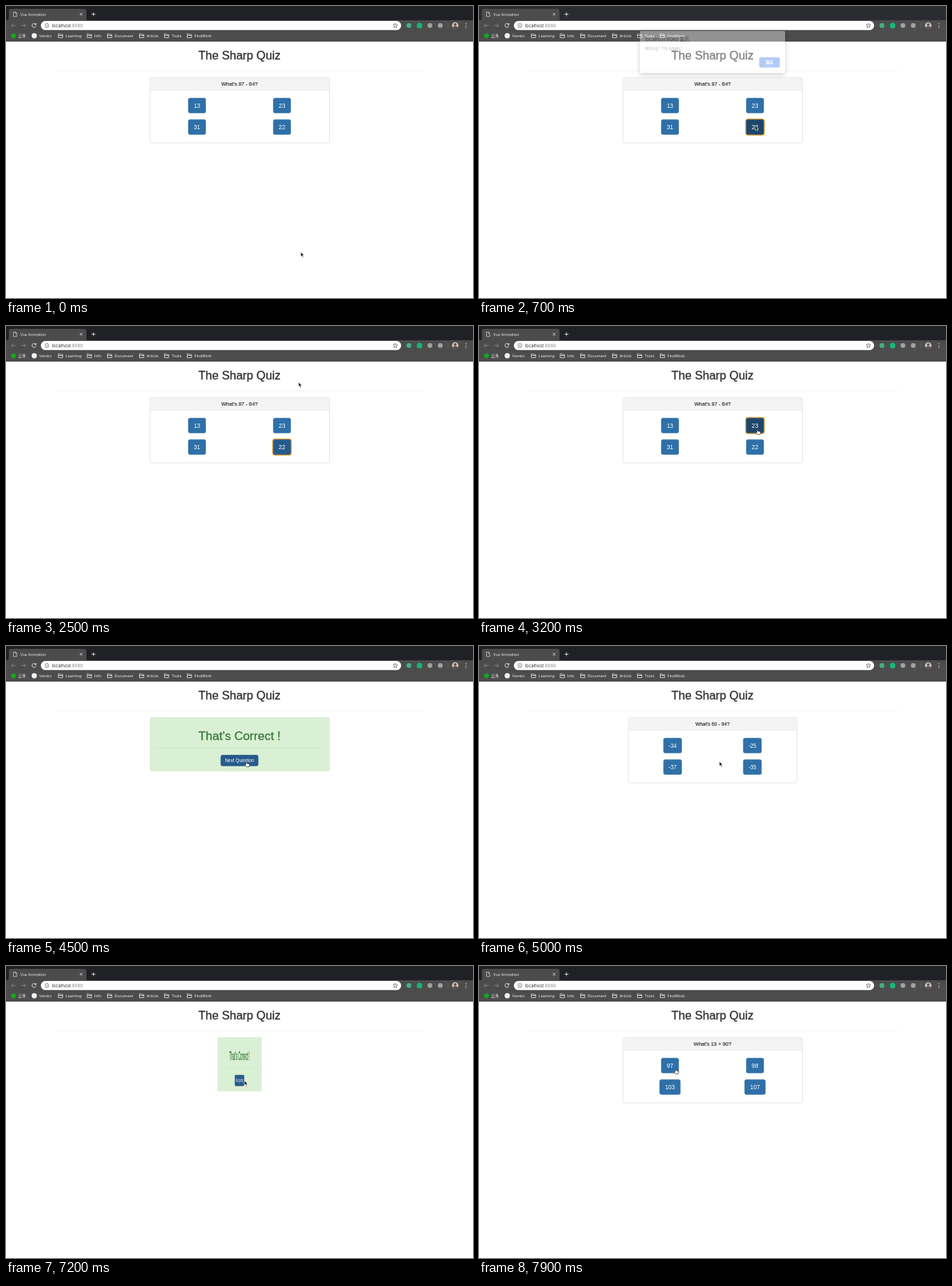
Recreate the animation shown at these times as an HTML page. Size 656 by 410 pixels, loop 8000 ms.

```html
<!DOCTYPE html>
<html lang="en">
<head>
<meta charset="utf-8">
<title>Quiz</title>
<style>
  html, body { margin: 0; height: 100%; overflow: hidden; background: #fff; }
  svg { display: block; width: 100vw; height: 100vh; }
  text { font-family: "Liberation Sans", Arial, sans-serif; white-space: pre; }
  .ui text { font-family: Inter, "Noto Sans CJK SC", "Noto Sans CJK", sans-serif; font-size: 5.4px; }
  .mid { text-anchor: middle; }
  .heading { font-size: 16.5px; stroke-width: .3px; }
  .question { font-size: 7.35px; fill: #333; stroke: #333; stroke-width: .2px; }
</style>
</head>
<body>
<svg viewBox="0 0 656 410">
  <defs>
    <filter id="shadow" x="-20%" y="-40%" width="140%" height="180%">
      <feDropShadow dx="0" dy="2" stdDeviation="3.5" flood-opacity=".5"/>
    </filter>
    <g id="folder" fill="none" stroke="#d4d4d4" stroke-width=".9">
      <path d="M.5 .5h2.3l.9 1h3v4.3H.5zM.5 2.8h6.2"/>
    </g>
  </defs>
  <rect width="656" height="410" fill="#fff"/>

  <text class="mid heading" x="328" y="74.5" fill="#2e2e2e" stroke="#2e2e2e">The Sharp Quiz</text>
  <path d="M69 91h519" stroke="#eee" stroke-width=".8"/>
  <g id="card"></g>

  <g class="ui">
    <rect id="strip" width="656" height="20" fill="#202125"/>
    <path d="M2 20q2 0 2-2V7q0-3 3-3h103q3 0 3 3v11q0 2 2 2h541v30H0V20z" fill="#4c4c4d"/>
    <path d="M10.5 8.5h3l1.6 1.6v4.6h-4.6zM13.3 8.5v1.8h1.8" fill="none" stroke="#ddd" stroke-width=".7"/>
    <text x="20" y="13.5" fill="#e4e4e4" style="font-size:5.3px">Vue Animation</text>
    <path d="M103.8 9.8l3.4 3.4m0-3.4l-3.4 3.4M120.2 11.5h5.4m-2.7-2.7v5.4" stroke="#e4e4e4" stroke-width=".9"/>
    <g fill="none" stroke-width=".9">
      <path d="M13.5 27.3H7.3m2.8-2.8l-2.8 2.8 2.8 2.8M21.5 27.3h6.2m-2.8-2.8l2.8 2.8-2.8 2.8" stroke="#858585"/>
      <path d="M41.6 25.5a2.8 2.8 0 1 0 .5 2.6M42.1 24v2.3h-2.3" stroke="#eee"/>
    </g>
    <rect x="49" y="21" width="506" height="12.8" rx="6.4" fill="#fff"/>
    <g fill="none" stroke="#555" stroke-width=".7">
      <circle cx="57.5" cy="27.4" r="2.8"/>
      <path d="M57.5 27v2.1m0-3.6v.8"/>
      <path d="M547 24.2l.9 2.1 2.3.2-1.7 1.5.5 2.3-2-1.2-2 1.2.5-2.3-1.7-1.5 2.3-.2z"/>
    </g>
    <text x="64.5" y="29.6" fill="#333" style="font-size:6.2px">localhost<tspan fill="#888">:8080</tspan></text>
    <circle cx="566" cy="27.4" r="3.4" fill="#3fb27f"/>
    <circle cx="581" cy="27.4" r="3.9" fill="#16b774"/>
    <circle cx="595.5" cy="27.4" r="3.3" fill="#a2a2a2"/>
    <circle cx="610" cy="27.4" r="3.3" fill="#a2a2a2"/>
    <path d="M621 23.5v8" stroke="#707070" stroke-width=".7"/>
    <circle cx="631" cy="27.3" r="4.6" fill="#c9bdb7"/>
    <path d="M628 30.8q0-2.6 3-2.6t3 2.6q-3 2-6 0z" fill="#574743"/>
    <circle cx="631" cy="26" r="1.7" fill="#574743"/>
    <path d="M646 24.6v.1m0 2.6v.1m0 2.6v.1" stroke="#e4e4e4" stroke-width="1.3" stroke-linecap="round"/>
    <circle cx="10.5" cy="41.8" r="3.4" fill="#15a51d"/>
    <circle cx="39.7" cy="41.8" r="3.7" fill="#eceef2"/>
    <g id="bookmarks" fill="#eee">
      <text x="17" y="43.8">云禾</text>
      <text x="46.5" y="43.8">Vemiro</text>
    </g>
  </g>

  <g id="dialog" class="ui">
    <rect x="226" y="35" width="204" height="59" rx="1.5" fill="#fff" filter="url(#shadow)"/>
    <text x="233.5" y="49.2" fill="#222" style="font-size:6.6px">localhost:8080 显示</text>
    <text x="233.3" y="62.4" fill="#555" style="font-size:5.75px">Wrong ! Try Again !</text>
    <rect x="393.6" y="72" width="29" height="14.3" rx="1.8" fill="#4279ea" stroke="#a0bdf2" stroke-width=".9"/>
    <text class="mid" x="408" y="81.1" fill="#fff" font-weight="600">确定</text>
  </g>

  <g id="cursor" stroke="#fff" stroke-width=".6" stroke-linejoin="round">
    <path id="arrow" d="M0 0v6.3l1.5-1.3 1 2.4 1.2-.5-1-2.3h2z" fill="#111"/>
    <path id="hand" d="M-.6 .5q.7-.8 1.3 0v2l2.9 .7q.9.3.8 1.2l-.5 2.9h-3.9L-2.2 4.6q.2-1 1.6-.1z"
      fill="#fff" stroke="#111"/>
  </g>
</svg>
<script>
const LOOP = 8000, FLIP = 300, MID = 328;
const el = id => document.getElementById(id);
const clamp = v => Math.min(1, Math.max(0, v));
const ramp = (t, from, to) => clamp((t - from) / (to - from));
const within = (t, spans) => spans.some(([from, to]) => t >= from && t < to);

const folders = { Learning: 73, Info: 113.5, Document: 142, Article: 187, Tools: 222, FindWork: 254 };
el('bookmarks').innerHTML += Object.entries(folders).map(([name, x]) =>
  `<use href="#folder" x="${x}" y="38.7"/><text x="${x + 10.6}" y="43.8">${name}</text>`).join('');

const NORMAL = '#2f70a9', HOVER = '#265b8c', ACTIVE = '#1f456a';
// Button states: from, to, fill, focus ring
const states = {
  '22': [[480, 580, HOVER], [580, 2450, ACTIVE, true], [2450, 3110, HOVER, true]],
  '23': [[3020, 3110, HOVER], [3110, 3530, ACTIVE, true]],
  '-34': [[5430, 5540, HOVER], [5540, 5930, ACTIVE, true]],
  'Next Question': [[4330, 4830, HOVER], [6600, 7300, HOVER]]
};

function button(label, x, y, width, height, size, t) {
  const [, , fill = NORMAL, ring] = (states[label] || []).find(s => t >= s[0] && t < s[1]) || [];
  const box = `x="${x - width / 2}" y="${y - height / 2}" width="${width}" height="${height}" rx="2.5"`;
  return (ring ? `<rect ${box} fill="none" stroke="#e9a53a" stroke-width="3"/>` : '') +
    `<rect ${box} fill="${fill}" stroke="#29659b" stroke-width=".4"/>
    <text class="mid" x="${x}" y="${y + size * .36}" font-size="${size}" fill="#fff">${label}</text>`;
}

function answer(label, i, t) {
  const ems = [...label].reduce((sum, c) => sum + (c === '-' ? .333 : .556), 0);
  return button(label, i % 2 ? 387.7 : 268.3, i < 2 ? 139.8 : 169.9, ems * 8.3 + 15.3, 21, 8.3, t);
}

const quiz = (question, ...answers) => t => `
  <rect x="202.2" y="100.3" width="252.3" height="91.8" rx="2" fill="#fff" stroke="#d8d8d8" stroke-width=".7"/>
  <path d="M202.5 118V102.3q0-1.7 1.7-1.7h248.3q1.7 0 1.7 1.7V118z" fill="#f4f4f4"/>
  <path d="M202.5 118.2h251.7" stroke="#ddd" stroke-width=".6"/>
  <text class="mid question" x="${MID}" y="112.1">What's ${question}?</text>
  ${answers.map((label, i) => answer(label, i, t)).join('')}`;

const correct = t => `
  <rect x="202" y="100" width="252.7" height="76" rx="1.8" fill="#daf0d4"/>
  <text class="mid heading" x="${MID}" y="132" fill="#39773a" stroke="#39773a" style="font-size:17px">That's Correct !</text>
  <path d="M210 143.4h236.5" stroke="#c8e3bd" stroke-width=".7"/>
  ${button('Next Question', MID, 160.8, 52.6, 15.4, 6.5, t)}`;

const views = [
  quiz('87 - 64', '13', '23', '31', '22'), correct,
  quiz('60 - 94', '-34', '-25', '-37', '-35'), correct,
  quiz('13 + 90', '97', '98', '103', '107')
];
const flips = [3230, 4523, 5623, 7000];

function drawCard(t) {
  const done = flips.filter(at => at <= t).length;
  const since = done ? t - flips[done - 1] : Infinity;
  const leaving = since < FLIP;
  const easeOut = p => 1 - (1 - p) ** 1.66;
  const turn = leaving ? easeOut(since / FLIP) : 1 - easeOut(clamp((since - FLIP) / FLIP));
  const scale = Math.cos(turn * Math.PI / 2);
  el('card').setAttribute('transform', `translate(${MID * (1 - scale)}) scale(${scale} 1)`);
  el('card').innerHTML = views[leaving ? done - 1 : done](t);
}

// Cursor moves: start, end, x, y
const moves = [
  [0, 0, 414, 345.5], [100, 560, 388, 168], [1380, 1700, 413, 87], [1750, 2100, 411, 79],
  [2700, 3080, 391, 145], [3980, 4420, 337.7, 162.3], [5020, 5500, 273.3, 146.8],
  [6250, 6680, 335, 161], [7480, 7880, 276, 144.2]
];
const handTimes = [[470, 680], [3000, 3420], [4320, 4700], [5420, 5800], [6580, 7180], [7770, LOOP]];

function drawCursor(t) {
  let [, , x, y] = moves[0];
  for (const [from, to, toX, toY] of moves.slice(1)) {
    const p = ramp(t, from, to), k = p * p * (3 - 2 * p);
    x += (toX - x) * k;
    y += (toY - y) * k;
  }
  const hand = within(t, handTimes);
  el('cursor').setAttribute('transform', `translate(${x} ${y})`);
  el('hand').style.display = hand ? '' : 'none';
  el('arrow').style.display = hand ? 'none' : '';
}

function drawDialog(t) {
  const shown = ramp(t, 650, 780) * (1 - ramp(t, 2330, 2480));
  const tint = [32, 33, 37].map(c => Math.round(c + 27 * shown));
  el('dialog').style.opacity = shown;
  el('strip').setAttribute('fill', `rgb(${tint})`);
}

function frame() {
  const t = performance.now() % LOOP;
  drawCard(t);
  drawDialog(t);
  drawCursor(t);
  requestAnimationFrame(frame);
}
frame();
</script>
</body>
</html>
```
